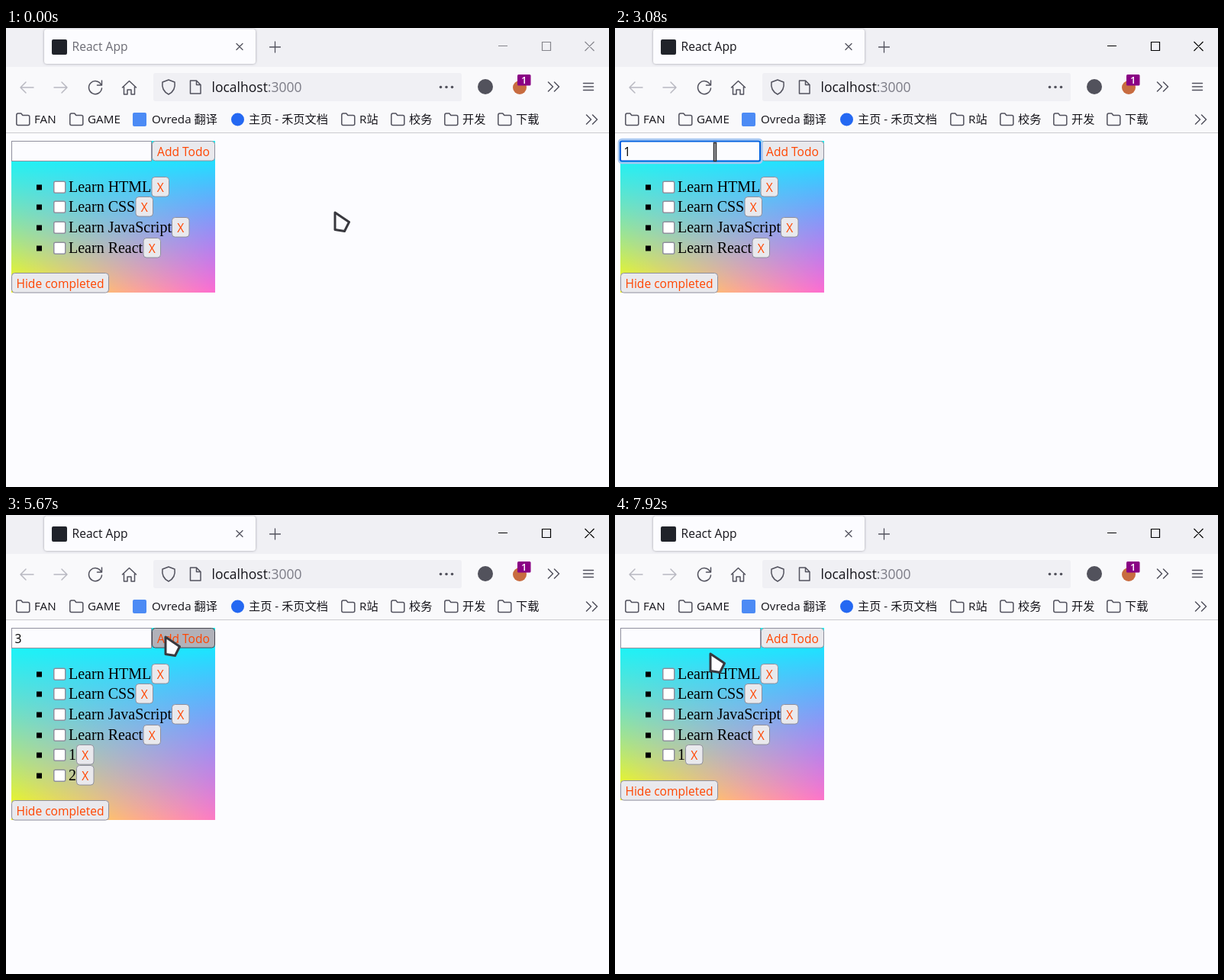
Recreate the animation shown at these times as an HTML page. Size 790 by 602 pixels, loop 8 s.

```html
<!DOCTYPE html>
<html lang="zh-CN">
<head>
<meta charset="utf-8">
<title>Todo list</title>
<style>
  html, body { margin: 0; width: 100%; height: 100%; overflow: hidden; background: #fcfcff; }
  svg { display: block; width: 790px; height: 602px; }
  text { font: 15.6px "Open Sans", "Noto Sans CJK SC", "Noto Sans CJK", sans-serif; white-space: pre; }
  .mark { font-size: 15.2px; fill: #15141a; }
  .item { font: 20px "Liberation Serif", "Times New Roman", serif; }
  .btn { fill: #ff4500; }
  .icon { fill: none; stroke: #52525e; stroke-width: 1.5; stroke-linejoin: round; stroke-linecap: round; }
  .dim { stroke: #b9b9c2; }
</style>
</head>
<body>
<svg viewBox="0 0 790 602" xmlns="http://www.w3.org/2000/svg">
  <defs>
    <filter id="shadow" x="-5%" y="-20%" width="110%" height="140%">
      <feDropShadow dx="0" dy="0" stdDeviation="1.6" flood-color="#50505c" flood-opacity=".55"/>
    </filter>
  </defs>

  <rect width="790" height="602" fill="#fcfcff"/>
  <rect width="790" height="138" fill="#f9f9fb"/>
  <rect width="790" height="51" fill="#f0f0f4"/>
  <rect x="50" y="1.5" width="277" height="45.5" rx="4" fill="#fcfcff" filter="url(#shadow)"/>
  <rect x="60" y="15" width="20" height="20" rx="2" fill="#20232a"/>
  <text id="title" x="86.5" y="30">React App</text>
  <path class="icon" d="M302 20.500l8 8m0-8l-8 8M345.500 25h14m-7-7v14" style="stroke-width:1.3"/>
  <g id="windowButtons" fill="none" stroke-width="1.2">
    <path d="M645 23.500h12M702.500 18.500h11v11h-11zM758.500 18l12 12m0-12l-12 12"/>
  </g>

  <rect x="193" y="59" width="404" height="37" rx="3" fill="#f0f0f4"/>
  <path class="icon dim" d="M36 78H19m7-7l-7 7 7 7M63 78h17m-7-7l7 7-7 7"/>
  <g class="icon">
    <path d="M124.500 74a8.500 8.500 0 1 0 1 5M125.500 69v6h-6"/>
    <path d="M152.500 78l9-8.500 9 8.500M154.500 77v10h4.500v-6h5v6h4.500V77"/>
    <path d="M213 68l8 3c1 7-2 13-8 16-6-3-9-9-8-16z"/>
    <path d="M241.500 69h8l5.500 5.500V86h-13.500zM249.500 69v5.500h5.500"/>
    <path d="M710.500 71l6 6-6 6m8-12l6 6-6 6M760.500 114l6 6-6 6m8-12l6 6-6 6"/>
    <path d="M756.500 72.500h13m-13 4.500h13m-13 4.500h13"/>
  </g>
  <text x="269.500" y="84" style="font-size:17.500px" fill="#15141a">localhost<tspan fill="#7c7c86">:3000</tspan></text>
  <g fill="#52525c">
    <circle cx="569.500" cy="77.500" r="1.8"/><circle cx="577" cy="77.500" r="1.8"/><circle cx="584.500" cy="77.500" r="1.8"/>
    <circle cx="628" cy="77" r="10"/>
  </g>
  <circle cx="673" cy="78" r="9" fill="#c86c40"/>
  <rect x="670" y="61" width="17.500" height="14.500" rx="1.500" fill="#8a0084"/>
  <text x="678.700" y="73" text-anchor="middle" fill="#fff" style="font-size:13px;font-weight:600">1</text>

  <g id="bookmarks"></g>
  <rect x="166" y="111" width="18" height="18" rx="2" fill="#4c8bf5"/>
  <circle cx="303.500" cy="120" r="8.500" fill="#2468f2"/>
  <path d="M0 137.500h790" stroke="#ccccd0"/>

  <g id="page"></g>
  <g id="cursor"></g>
</svg>
<script>
const $ = id => document.getElementById(id);

const FPS = 12, FRAMES = 96, ROW = 26.6;

const folder = x => `<path class="icon" d="M${x + .8} 114.500v11q0 2 2 2h13q2 0 2-2v-9q0-2-2-2h-7l-2-2.500h-4q-2 0-2 2.500z"/>`;
const label = (x, text) => `<text class="mark" x="${x}" y="125">${text}</text>`;
$('bookmarks').innerHTML =
  [[13, 'FAN'], [83, 'GAME'], [439, 'R站'], [504, '校务'], [574, '开发'], [644, '下载']]
    .map(([x, text]) => folder(x) + label(x + 24, text)).join('') +
  label(191, 'Ovreda 翻译') + label(318, '主页 - 禾页文档');

// Cursor way points: frame, x, y. Each stroke starts and ends softly.
const path = [
  [0, 429, 240], [5, 317, 194], [6, 326, 200], [7, 326, 200],
  [12, 0, 271], [15, 34, 221], [17, 32, 219], [22, 114, 174], [27, 114, 174],
  [31, 123, 163], [33, 123, 163], [37, 131, 162], [40, 206, 159], [43, 208, 160],
  [45, 163.5, 162], [49, 163.5, 162], [53, 207, 160], [56, 208, 162], [58, 165, 163],
  [65, 165, 163], [68, 207, 158], [71, 207, 158], [79, 91, 358], [80, 91, 358],
  [84, 98, 334], [89, 98, 334], [95, 123, 180]
];

function cursorAt(frame) {
  const next = Math.max(1, path.findIndex(p => p[0] >= frame));
  const [f0, x0, y0] = path[next - 1], [f1, x1, y1] = path[next];
  const u = (frame - f0) / (f1 - f0), s = u * u * (3 - 2 * u);
  return [x0 + (x1 - x0) * s, y0 + (y1 - y0) * s];
}

const within = (v, from, to) => v >= from && v < to;
const during = (f, ...spans) => spans.some(([from, to]) => within(f, from, to));

function stateAt(f) {
  const items = [['Learn HTML', 108.5], ['Learn CSS', 87.5], ['Learn JavaScript', 135], ['Learn React', 97.5]];
  if (f >= 42) items.push(['1', 10]);
  if (within(f, 55, 87)) items.push(['2', 10]);
  if (within(f, 70, 89)) items.push(['3', 10]);
  const value = within(f, 31, 42) ? '1' : within(f, 50, 55) ? '2' : within(f, 65, 70) ? '3' : '';
  const focused = during(f, [22, 41], [47, 53], [58, 68]);
  const pressed = during(f, [41, 42], [53, 55], [68, 70], [86, 87], [88, 89]);
  const lastInput = [22, 31, 47, 50, 58, 65].filter(k => k <= f).pop();
  const caret = focused && (f - lastInput) % 12 < 6;
  return { items, value, focused, pressed, caret, active: f >= 22, mouse: cursorAt(f) };
}

const overInput = ([x, y]) => within(x, 7, 190) && within(y, 147, 175);

function button(x, y, w, text, { mouse, pressed }) {
  const hover = within(mouse[0] + 2, x, x + w) && within(mouse[1] + 2, y, y + ROW);
  const [fill, stroke] = !hover ? ['#e9e9ed', '#8f8f9d'] : pressed ? ['#b1b1b9', '#484851'] : ['#d0d0d7', '#676774'];
  return `<rect x="${x + .5}" y="${y + .5}" width="${w - 1}" height="${ROW - 1}" rx="4" fill="${fill}" stroke="${stroke}"/>
    <text class="btn" x="${x + w / 2}" y="${y + 19.600}" text-anchor="middle">${text}</text>`;
}

function row([text, width], i, state) {
  const top = Math.round(195 + ROW * i - .2), y = top + 20;
  return `<rect x="40" y="${y - 9.5}" width="7" height="7"/>
    <rect x="62.750" y="${y - 13.750}" width="15" height="15" rx="2" fill="#fff" stroke="#8f8f9d" stroke-width="1.5"/>
    <text class="item" x="82" y="${y}">${text}</text>` +
    button(82 + width, top, 23.5, 'X', state);
}

function input({ value, focused, caret, mouse }) {
  const box = focused
    ? `<rect x="5" y="146" width="187.500" height="31" rx="4" fill="none" stroke="#a8c8f2" stroke-width="2.500"/>
       <rect x="7" y="148.500" width="183" height="26" rx="2" fill="#fcfcff" stroke="#0060df" stroke-width="2"/>`
    : `<rect x="7.500" y="148.500" width="183" height="26" fill="#fcfcff" stroke="${overInput(mouse) ? '#676774' : '#8f8f9d'}"/>`;
  const caretX = value ? 21.5 : 12.5;
  return box + `<text x="11.500" y="168">${value}</text>` +
    (caret ? `<path d="M${caretX} 151v21" stroke="#000"/>` : '');
}

// Cyan from the top, magenta from the top right and yellow from the bottom left, each fading out.
function backdrop(x, y, w, h) {
  const cx = x + w / 2, cy = y + h / 2, d = (w + h) / 4;
  const layer = (color, x1, y1, x2, y2) =>
    `<linearGradient id="${color}" gradientUnits="userSpaceOnUse" x1="${x1}" y1="${y1}" x2="${x2}" y2="${y2}">
      <stop stop-color="${color}"/><stop offset="1" stop-color="${color}" stop-opacity="0"/></linearGradient>
    <rect x="${x}" y="${y}" width="${w}" height="${h}" fill="url(#${color})"/>`;
  return layer('yellow', cx - d, cy + d, cx + d, cy - d) +
    layer('magenta', cx + d, cy - d, cx - d, cy + d) +
    layer('cyan', x, y, x, y + h);
}

function pointer([x, y]) {
  return overInput([x, y])
    ? `<rect x="${x - 1.5}" y="${y - 11.5}" width="3" height="24" fill="#b4b4b8" stroke="#2c2c30" stroke-width="1.5"/>`
    : `<path transform="translate(${x} ${y})" d="M2 2V24.500L14.500 26.500L20.500 14.500Z"
        fill="#fcfcff" stroke="#38383e" stroke-width="3" stroke-linejoin="round"/>`;
}

function draw(frame) {
  const state = stateAt(frame);
  const extra = Math.round((state.items.length - 4) * ROW);
  $('title').setAttribute('fill', state.active ? '#15141a' : '#6b6b74');
  $('windowButtons').setAttribute('stroke', state.active ? '#000' : '#85858c');
  $('page').innerHTML =
    backdrop(7, 148, 267, 199 + extra) +
    button(191, 148, 83, 'Add Todo', state) +
    input(state) +
    state.items.map((item, i) => row(item, i, state)).join('') +
    button(7, 321 + extra, 128, 'Hide completed', state);
  $('cursor').innerHTML = pointer(state.mouse);
}

const start = performance.now();
let shown = -1;
function tick() {
  const time = (performance.now() - start) % 8000;
  const frame = Math.min(FRAMES - 1, Math.floor((time + 4) * FPS / 1000));
  if (frame !== shown) draw(shown = frame);
  requestAnimationFrame(tick);
}
tick();
</script>
</body>
</html>
```
